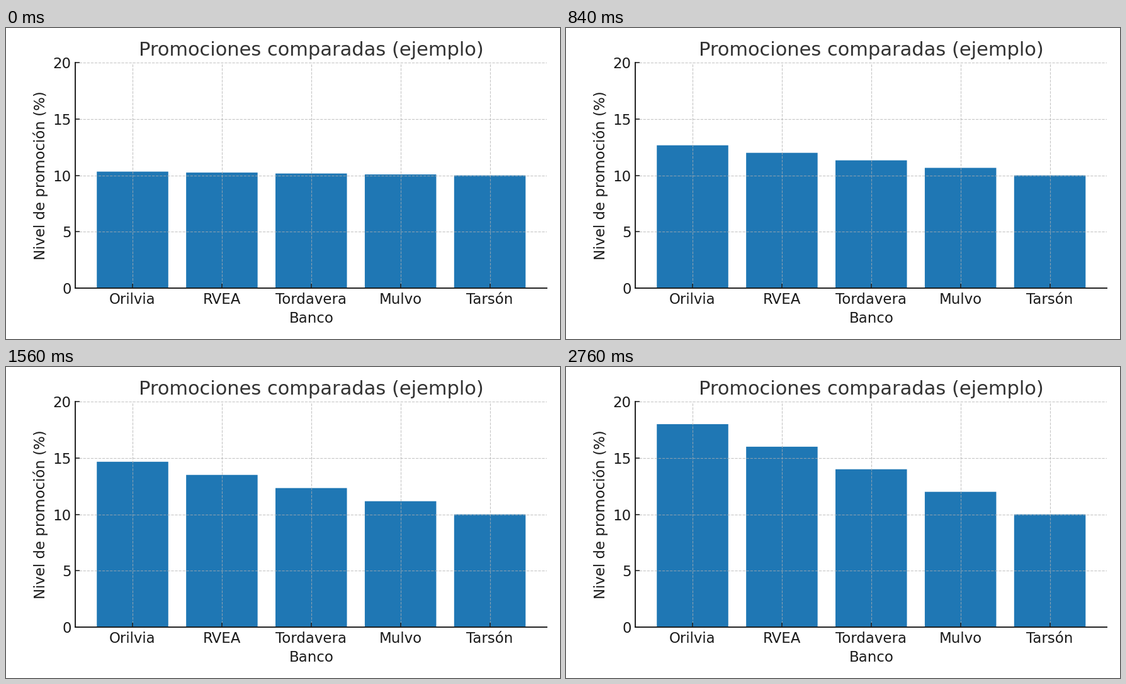
A matplotlib script that plays this animation: 880 px wide and 495 px high, repeating every 2.88 s.

```python
import numpy as np
import matplotlib.pyplot as plt
from matplotlib.animation import FuncAnimation

DPI, W, H = 137.5, 880, 495
FRAMES, INTERVAL = 24, 120
INK = "#1a1a1a"

BANKS = ["Orilvia", "RVEA", "Tordavera", "Mulvo", "Tarsón"]
START = 10
GOALS = np.array([18, 16, 14, 12, 10])

plt.rcParams["font.family"] = "DejaVu Sans"

fig, ax = plt.subplots(figsize=(W / DPI, H / DPI), dpi=DPI, facecolor="white")
bars = ax.bar(BANKS, np.full(len(BANKS), START), color="#1f77b4", snap=False)
ax.set_ylim(0, 20)

ax.grid(True, color="#b0b0b0", linestyle="--", linewidth=0.6, alpha=0.7)
ax.spines[["top", "right"]].set_visible(False)
for side in ("left", "bottom"):
    ax.spines[side].set(linewidth=1, color=INK)
ax.tick_params(direction="in", color=INK, labelcolor=INK, labelsize=12)

ax.set_title("Promociones comparadas (ejemplo)", fontsize=16, color="#333333")
ax.set_xlabel("Banco", fontsize=12, color=INK)
ax.set_ylabel("Nivel de promoción (%)", fontsize=12, color=INK)

# Laid out while the ticks are still 2.5 apart, which leaves a wide left margin;
# the smaller axes then settle on steps of 5.
fig.tight_layout()


def update(i):
    heights = START + (GOALS - START) * (i + 1) / FRAMES
    for bar, height in zip(bars, heights):
        bar.set_height(height)
    return list(bars)


anim = FuncAnimation(fig, update, frames=FRAMES, interval=INTERVAL,
                     init_func=lambda: update(0), repeat=True, repeat_delay=0)
plt.show()
```
